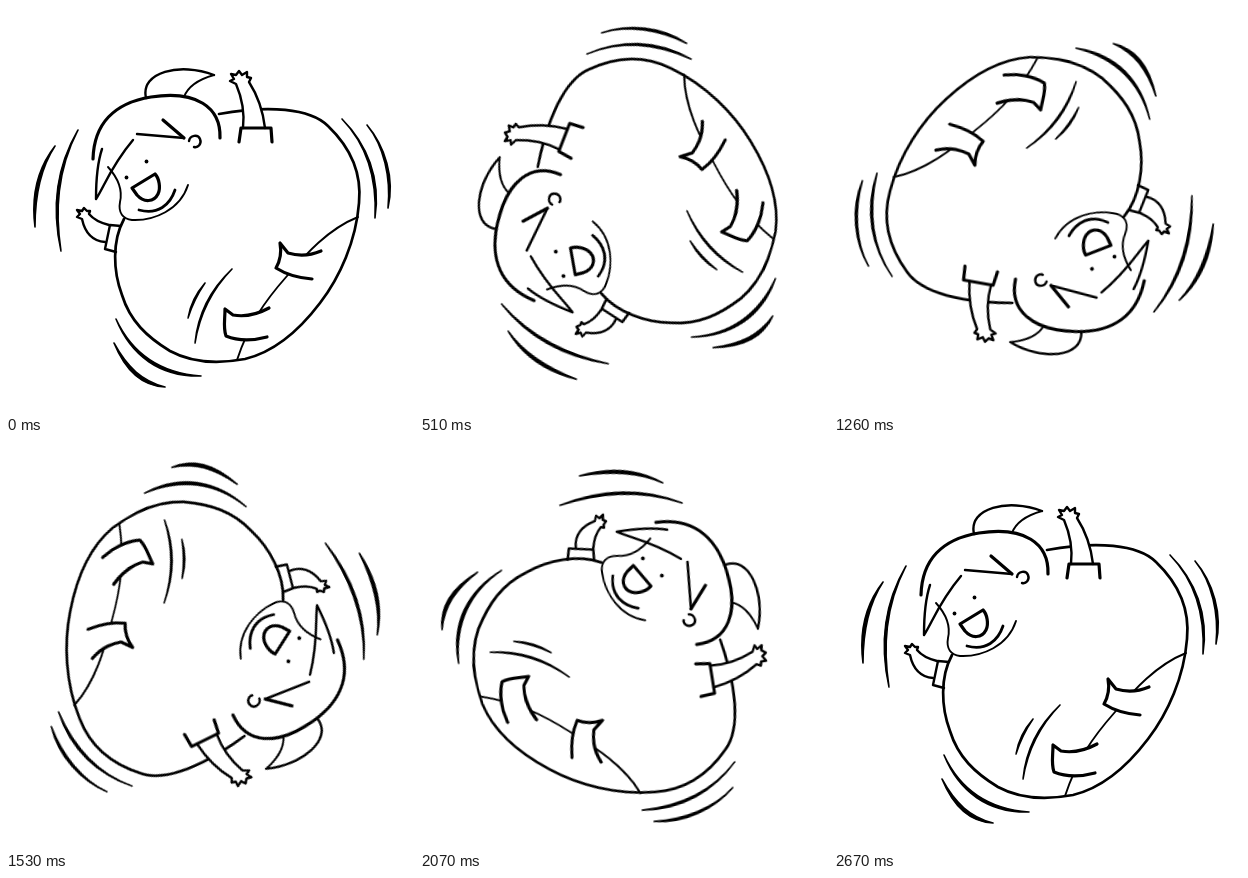
Recreate the animation shown at these times as an HTML page without scripts. Size 408 by 408 pixels, loop 2.7 s.

```html
<!DOCTYPE html>
<html lang="en">
<head>
<meta charset="utf-8">
<title>Rolling along</title>
<style>
  html, body { margin: 0; width: 100%; height: 100%; overflow: hidden; background: #fff; }
  svg { display: block; width: 100vw; height: 100vh; }
  .roller {
    fill: none; stroke: #000; stroke-width: 2.4;
    stroke-linecap: round; stroke-linejoin: round;
    transform-origin: 204px 204px;
    animation: roll 2.7s steps(90, jump-none) infinite;
  }
  .thin { stroke-width: 1.9; }
  .bold { stroke-width: 3.2; }
  .cover { fill: #fff; }
  .swoosh { fill: #000; stroke-width: 1.6; }
  .eyes { fill: #000; stroke: none; }
  @keyframes roll { to { transform: rotate(-360deg); } }
</style>
</head>
<body>
<svg viewBox="0 0 408 408">
  <g class="roller">
    <!-- body and hem -->
    <path d="M118 213C106 235 107 265 116 289C124 315 141 331 164 345C186 357 212 358 239 353C268 346 292 326 314 297C334 271 350 235 353 197C356 167 345 142 322 120C304 102 262 99 213 108" stroke-width="2.7"/>
    <path class="thin" d="M352 211C322 223 300 248 281 270C258 296 243 318 231 354"/>

    <!-- legs -->
    <g class="cover bold">
      <path d="M315 245C303 250 292 250 282 247L274 237C276 248 274 255 270 262C281 269 293 272 306 273"/>
      <path d="M263 302C250 309 238 311 227 309L219 303C219 314 217 322 220 330C232 335 246 335 261 331"/>
    </g>

    <!-- arms -->
    <path class="cover" d="M237 122C239 105 236 92 230 78L224 75L228 73L225 68L230 69L233 65L236 69L241 66L241 71L245 72L243 76C252 90 257 105 259 122"/>
    <path class="bold" d="M233 136L235 122L265 122L266 136"/>
    <path d="M99 236C87 235 79 227 76 213L71 211L74 208L71 204L76 205L78 202L81 205L84 205L83 208C88 214 95 217 103 219"/>
    <path d="M115 220L104 219L99 243L110 246"/>

    <!-- hair -->
    <path class="bold" d="M87 153C88 118 108 97 145 91C190 84 215 101 214 132"/>
    <path d="M140 92C134 66 174 56 208 69"/>
    <path class="thin" d="M208 69C194 73 182 80 178 91"/>
    <path d="M96 143C91 158 90 176 90 193C98 181 105 160 127 134"/>
    <path d="M131 128L178 132"/>
    <path class="bold" d="M178 132L157 114"/>

    <!-- face -->
    <path d="M183 135C184 129 192 128 194 133C196 138 192 142 188 141"/>
    <g class="eyes"><circle cx="140.5" cy="155.5" r="1.9"/><circle cx="120.5" cy="171.5" r="1.9"/></g>
    <path class="bold" d="M126 182L149 168C153 172 155 182 152 188C148 196 138 197 131 189Z"/>
    <path class="thin" d="M102 161C112 172 117 183 114 196C112 207 117 213 126 214C148 215 174 204 182 179"/>
    <path d="M133 204C152 209 164 199 169 184" stroke-width="2.8"/>

    <!-- speed lines -->
    <g class="swoosh">
      <path d="M49 140C31 163 25 190 29 221C29 190 34 163 49 140"/>
      <path d="M72 124C48 165 46 205 55 245C49 205 51 165 72 124"/>
      <path d="M336 113C360 138 371 172 369 212C375 172 361 138 336 113"/>
      <path d="M361 119C378 140 385 172 382 202C389 172 379 140 361 119"/>
      <path d="M110 313C126 347 154 367 195 370C154 371 125 350 110 313"/>
      <path d="M108 337C121 361 136 375 159 381C135 380 119 364 108 337"/>
      <path d="M226 263Q193 294 189 337Q196 294 226 263"/>
      <path d="M199 277Q185 293 182 312Q188 293 199 277"/>
    </g>
  </g>
</svg>
</body>
</html>
```
